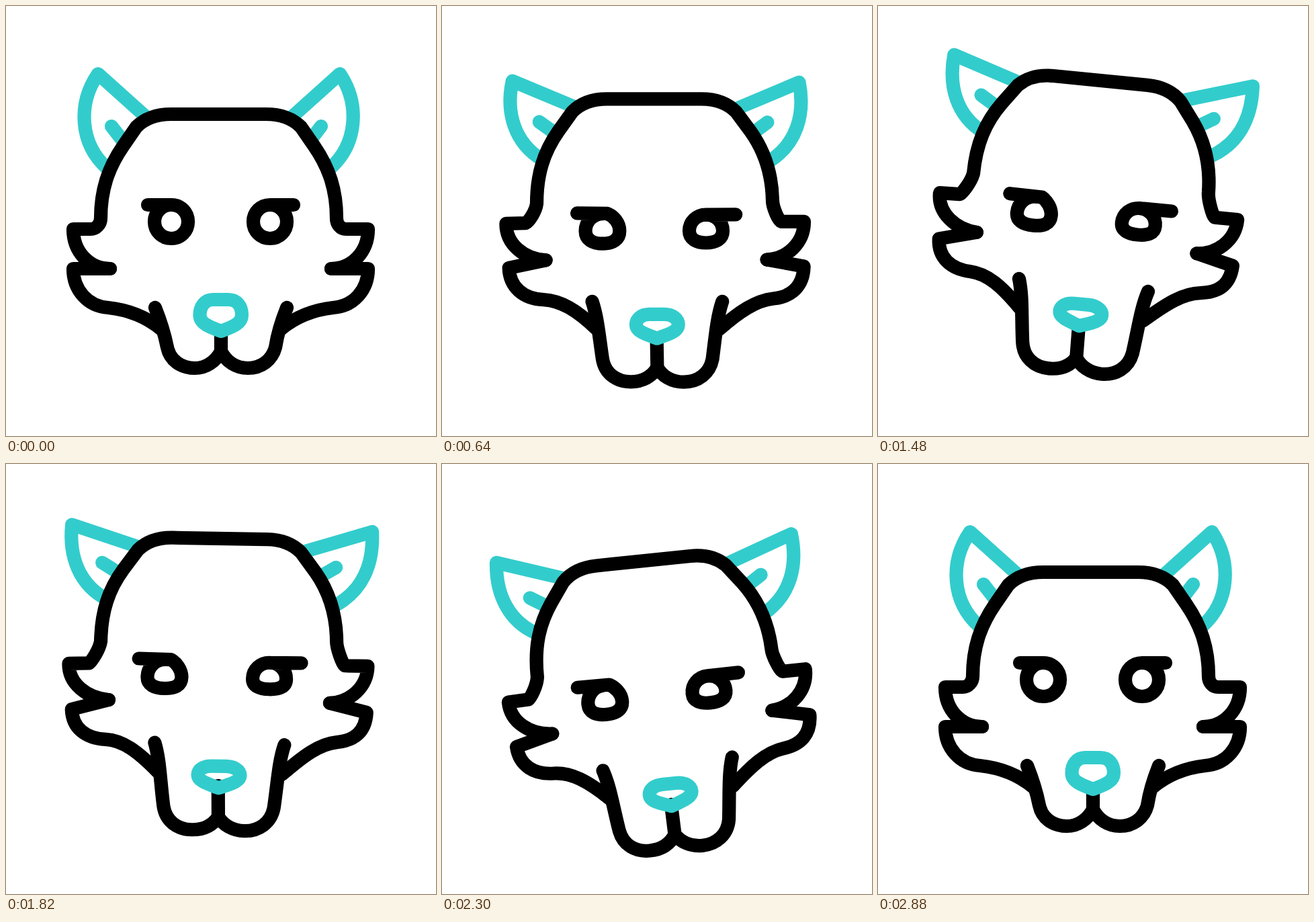
Write an HTML page that moves like this. It is 640 px wide and 640 px high and loops after 3.6 s.

```html
<!DOCTYPE html>
<html lang="en">
<head>
<meta charset="utf-8">
<title>Howling wolf</title>
<style>
  html, body { margin: 0; width: 100%; height: 100%; overflow: hidden; background: #fff; }
  svg { display: block; width: 100%; height: 100%; }
  path { fill: none; stroke-width: 20.2; stroke-linecap: round; stroke-linejoin: round; }
</style>
</head>
<body>
<svg viewBox="0 0 640 640"><g id="wolf"></g></svg>
<script>
const LOOP = 3600, STEP = 20;
const TEAL = '#33cccc', BLACK = '#000';
const wolf = document.getElementById('wolf');
const parts = [];

// Each part blends number by number from its calm path to its howling path.
function part(color, calm, howl, fill = 'none') {
  const el = document.createElementNS('http://www.w3.org/2000/svg', 'path');
  el.setAttribute('stroke', color);
  el.style.fill = fill;
  wolf.appendChild(el);
  const goal = howl.match(/[\d.]+/g).map(Number);
  parts.push(m => {
    let i = 0;
    el.setAttribute('d', calm.replace(/[\d.]+/g, n => (+n + (goal[i++] - n) * m).toFixed(2)));
  });
  return el;
}

// ears
part(TEAL,
  'M215 171 L137 101 C106 146 110 205 150 241 M157 179 L178 206',
  'M204 149.6 L95 115.3 C91 163 107.5 205 150 226 M141 171 L171 189');
part(TEAL,
  'M419 171 L497 101 C527 146 523 205 483 241 M469 179 L450 204',
  'M439 150 L542 118 C545 166 529.5 206 488 229 M489 172 L464 187');

// skull and upper cheeks
part(BLACK,
  'M155 391 C124 391 100 366 100 332 L126 332 C134 332 141 325 141 316 C141 274 152 241 174 209 ' +
  'L194 180 C206 168 224 161 246 161 L387 161 C409 161 427 168 439 180 L459 209 ' +
  'C481 241 492 274 492 316 C492 325 498 332 506 332 L539 332 C539 366 515 391 484 391',
  'M154.5 375 C122 373 94 352 94 322 L124 321 C128 318 139 301 141 288 C141 244 151 211 173 180 ' +
  'L194 151 C206 139 223 132 245 132 L386 132 C408 132 425 139 437 151 L459 180 ' +
  'C480 209 491 244 492 282 C492 292 502 318 505 318 L539 318 C539 350 513 372 483.5 374',
  '#fff');

// lower cheeks
part(BLACK,
  'M155 391 L100 391 C100 423 122 447 152 449 C180 452 208 462 231 481',
  'M154.5 375 L99.5 390 C101 418 121 433 151 434 C176 435 198 450 229 480.5');
part(BLACK,
  'M484 391 L539 391 C539 423 517 447 487 449 C460 452 432 462 409 481',
  'M483.5 374 L538.5 387 C537.5 416 521 429 495 432 C469 435 446 453 414 481.5');

// muzzle
part(BLACK,
  'M222 449 C230 469 236 488 240 508 C244 527 260 539 281 539 C298 539 312 529 320 514',
  'M224 437.5 C232 462 233 492 238.5 530.5 C242 554 260 566 281 566 C300 566 313 558 320.5 546');
part(BLACK,
  'M418 449 C410 469 404 488 401 508 C396 527 380 539 360 539 C342 539 328 529 320 514 L320 488',
  'M417 437.5 C409 462 408 492 403 531.5 C399 554 381 566.5 360 566.5 C342 566.5 328 558 320.5 546 L319.5 500');

// eyes with brows
part(BLACK,
  'M211 296 L246 296 C260 296 271 307 271 321 C271 335 260 346 246 346 C232 346 221 335 221 321 C221 307 232 296 246 296',
  'M198 312.7 L246 313.4 C254 318 262.3 328 262.3 339.3 C262.3 352 252 356.5 237.4 356.5 C222 356.5 211.3 352 211.3 339.6 C211.3 326 222 313.5 237.4 313.5');
part(BLACK,
  'M428 296 L393 296 C379 296 368 307 368 321 C368 335 379 346 393 346 C407 346 418 335 418 321 C418 307 407 296 393 296',
  'M440 315.2 L393 315.5 C379 315.5 368 326 368 339.5 C368 351 379 355 393 355 C408 355 418 351 418 339.5 C418 326 407 315.5 393 315.5');

const nose = part(TEAL,
  'M308 437 L331 437 C344 437 351 447 351 460 C351 473 336 478 320 484 C304 478 288.5 473 288.5 460 C288.5 447 296 437 308 437 Z',
  'M309 466 L331 466 C342 466 352 471 352 479.5 C352 489 335 493 320 498.5 C306 493 289 489 289 479.5 C289 471 298 466 309 466 Z');

// Eased value of a track made of [start, end, from, to] moves.
function track(t, moves) {
  let v = moves[0][2];
  for (const [start, end, from, to] of moves) {
    if (t < start) break;
    const u = Math.min(1, (t - start) / (end - start));
    v = from + (to - from) * u * u * (3 - 2 * u);
  }
  return v;
}

const HOWL = [[310, 790, 0, 1], [2190, 2870, 1, 0]];
const LIFT = [[600, 1100, 0, -22], [1760, 2380, -22, 11], [2380, 2760, 11, 0]];
const TILT = [[1040, 1440, 0, 5.65], [1560, 2160, 5.65, -5.9], [2360, 2880, -5.9, 0]];
const SNIFF = [[1440, 2080, 0, 7.5], [2080, 2540, 7.5, 0]];

function draw(ms) {
  const t = Math.floor((ms % LOOP) / STEP) * STEP;
  const m = track(t, HOWL);
  parts.forEach(p => p(m));
  nose.setAttribute('transform', `translate(0 ${track(t, SNIFF).toFixed(2)})`);
  wolf.setAttribute('transform',
    `translate(0 ${track(t, LIFT).toFixed(2)}) rotate(${track(t, TILT).toFixed(3)} 314 290)`);
}

const t0 = performance.now();
function tick() {
  draw(performance.now() - t0);
  requestAnimationFrame(tick);
}
tick();
</script>
</body>
</html>
```
